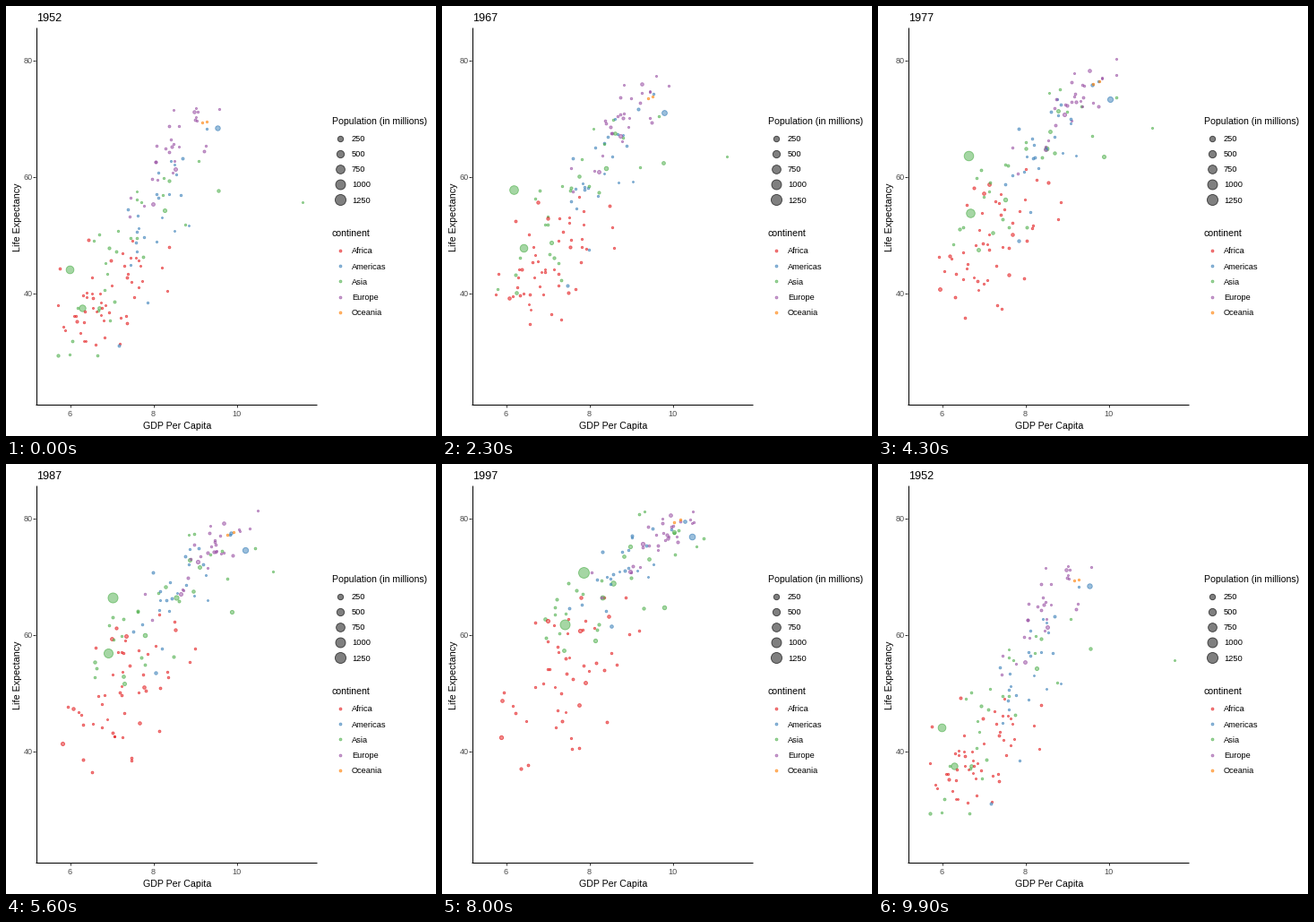
A matplotlib script that plays this animation: 480x480 px, repeating every 10 s.

```python
import numpy as np
import matplotlib.pyplot as plt
from matplotlib.animation import FuncAnimation
from matplotlib.colors import to_rgba

STAGE, DPI = 480, 80
PT = 72 / DPI  # points per pixel
plt.rcParams["font.family"] = "Liberation Sans"

COLORS = {"Africa": "#E41A1C", "Americas": "#377EB8", "Asia": "#4DAF4A",
          "Europe": "#984EA3", "Oceania": "#FF7F00"}
YEARS = np.arange(1952, 2008, 5)
T = np.linspace(0, 1, len(YEARS))[:, None]
TOP_POP = 1319

# count, wealth from/to, wealth spread, life from/to, life spread from/to,
# correlation, median population, growth
CROWDS = {
    "Africa": (52, 6.85, 7.55, .72, 39.3, 55.0, 5.0, 8.5, .55, 2.5, 3.7),
    "Americas": (24, 8.10, 9.00, .52, 53.2, 73.7, 8.5, 3.6, .75, 3, 2.5),
    "Asia": (30, 7.30, 8.75, .95, 46.5, 71.0, 8.5, 6.0, .75, 6, 3.0),
    "Europe": (30, 8.50, 9.92, .52, 64.6, 77.6, 5.2, 2.8, .80, 8, 1.3),
    "Oceania": (2, 9.24, 10.29, .05, 69.3, 80.7, .2, .5, .90, 4, 2.0),
}

# Standout countries: continent, population from/to, wealth from/to and easing
# power, life from/to and easing power
GIANTS = [
    ("Asia", 556, 1319, 5.99, 8.51, 1.7, 44.0, 73.0, .5),
    ("Asia", 372, 1110, 6.30, 7.80, 1.7, 37.4, 64.7, .65),
    ("Americas", 158, 301, 9.55, 10.67, 1, 68.4, 78.2, .9),
    ("Asia", 1, 3, 11.6, 10.4, 1, 55.6, 77.6, .7),
]

# Twelve even changes per loop, drawn in whole frames
FRAMES, HOLD, MOVE = 100, 5, 4


def px(v):
    return 71.8 + (v - 6) * 46.35


def py(v):
    return 60.7 + (80 - v) * 6.5


def diameter(size):
    return .75 * 2.845 * size - .4


def pop_size(pop):
    return 1 + 5 * np.sqrt(np.asarray(pop) / TOP_POP)


def ease(a, b, power=1):
    return a + (b - a) * T ** power


def fold(v, low, high):
    """Reflect stray values back inside the range."""
    v = low + abs(v - low)
    return high - abs(high - v)


def crowd(rng, n, x0, x1, sx, y0, y1, s0, s1, corr, pop, growth):
    def drift():
        a, b = rng.standard_normal((2, n))
        a, b = ((s - s.mean()) / s.std() for s in (a, b))
        return np.cos(.9 * T) * a + np.sin(.9 * T) * b

    u, v = drift(), drift()
    z = corr * u + np.sqrt(1 - corr ** 2) * v
    wealth = ease(x0, x1) + sx * (1 + .2 * T) * u
    life = ease(y0, y1, .65) + ease(s0, s1) * z
    p = np.clip(pop * np.exp(rng.normal(0, 1.1, n)), .2, 80)
    return fold(wealth, 5.7, 10.8), fold(life, 28, 82), ease(p, p * growth)


def build():
    rng = np.random.default_rng(12)
    parts, colors = [], []
    for name, rule in CROWDS.items():
        parts.append(crowd(rng, *rule))
        colors += [COLORS[name]] * rule[0]
    for name, p0, p1, x0, x1, xp, y0, y1, yp in GIANTS:
        parts.append((ease(x0, x1, xp), ease(y0, y1, yp), ease(p0, p1)))
        colors.append(COLORS[name])
    order = rng.permutation(len(colors))
    x, y, pop = (np.hstack(part)[:, order] for part in zip(*parts))
    return px(x), py(y), diameter(pop_size(pop)), [colors[i] for i in order]


fig = plt.figure(figsize=(STAGE / DPI, STAGE / DPI), dpi=DPI, facecolor="white")
ax = fig.add_axes([0, 0, 1, 1])
ax.set_xlim(0, STAGE)
ax.set_ylim(STAGE, 0)
ax.axis("off")


def label(x, y, text, size, color="black", **kw):
    return ax.text(x, y, text, fontsize=size * PT, color=color,
                   va="baseline", **kw)


def line(x, y, color="black"):
    ax.plot(x, y, color=color, lw=PT, solid_capstyle="butt")


def centre(v):
    """Middle of the pixel that holds v."""
    return np.floor(v) + .5


def dots(x, y, d, colors):
    return ax.scatter(centre(x), centre(y), s=(d * PT) ** 2,
                      facecolors=[to_rgba(c, .5) for c in colors],
                      edgecolors=[to_rgba(c, .65) for c in colors],
                      linewidths=.9 * PT, zorder=3)


# axes
line([33.5, 33.5], [24, 445])
line([33, 347], [444.5, 444.5])
for v in (6, 8, 10):
    x = centre(px(v))
    line([x, x], [445, 448], "#333333")
    label(x, 458.5, str(v), 9.2, "#4D4D4D", ha="center")
for v in (40, 60, 80):
    y = centre(py(v))
    line([30, 33], [y, y], "#333333")
    label(29.5, y + 3.7, str(v), 9.2, "#4D4D4D", ha="right")
label(191, 472.5, "GDP Per Capita", 10.6, ha="center")
label(15.5, 236, "Life Expectancy", 10.8, ha="center", rotation=90,
      rotation_mode="anchor")
title = label(34.5, 17, "1952", 12.6)

# legends
label(364, 132, "Population (in millions)", 10.5)
for i, pop in enumerate((250, 500, 750, 1000, 1250)):
    y = 147 + 17.2 * i
    dots(372.5, y, diameter(pop_size(pop)), ["black"])
    label(386, y + 3.8, str(pop), 9.3)
label(364, 257, "continent", 10.5)
for i, (name, color) in enumerate(COLORS.items()):
    y = 272.5 + 17.2 * i
    dots(372.5, y, diameter(1.5), [color])
    label(386, y + 3.8, name, 9.3)

X, Y, D, point_colors = build()
cloud = dots(X[0], Y[0], D[0], point_colors)

# each change starts a little under nine frames after the last
starts = HOLD + np.round(np.arange(len(YEARS)) * 8.27 + .35).astype(int)


def moment(n):
    """Indices of the two neighbouring years and the progress between them."""
    i = np.searchsorted(starts, n, side="right") - 1
    if i < 0:
        return 0, 0, 0.0
    return i, (i + 1) % len(YEARS), min(1, (n - starts[i] + 1) / MOVE)


def draw(n):
    a, b, p = moment(n)
    mix = lambda m: m[a] + (m[b] - m[a]) * p
    cloud.set_offsets(np.column_stack([centre(mix(X)), centre(mix(Y))]))
    cloud.set_sizes((mix(D) * PT) ** 2)
    title.set_text(str(YEARS[a] if p < .5 else YEARS[b]))
    return cloud, title


anim = FuncAnimation(fig, draw, frames=FRAMES, interval=100, repeat=True,
                     repeat_delay=0, blit=False)
plt.show()
```
